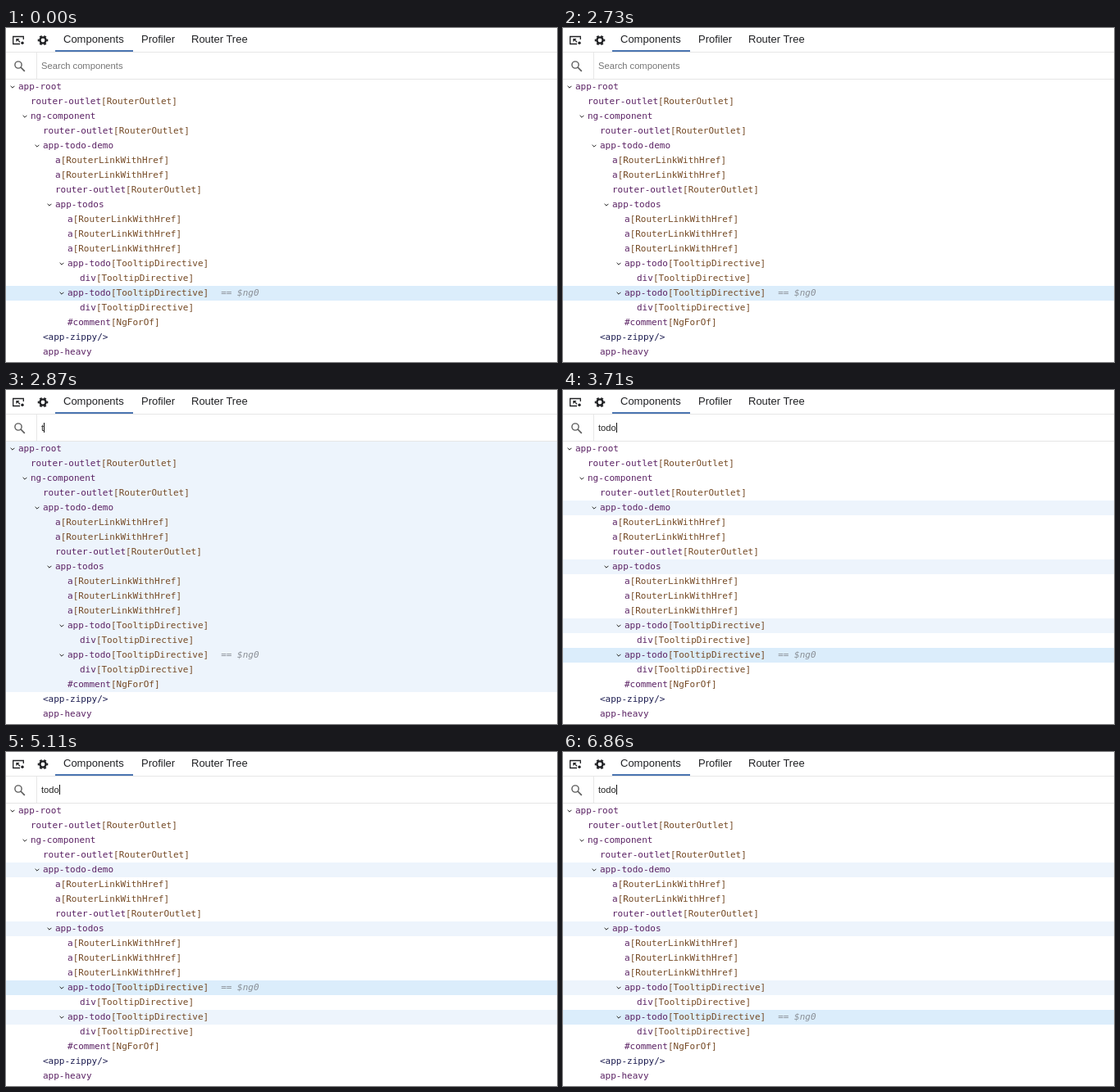
These frames come from a looping animation (672x408 px, 7.35 s). An HTML page:

```html
<!DOCTYPE html>
<html lang="en">
<head>
<meta charset="utf-8">
<title>Component tree search</title>
<style>
html, body { margin: 0; width: 100%; height: 100%; overflow: hidden; background: #fff; }
#stage { position: relative; width: 672px; height: 408px; overflow: hidden; font-family: "Liberation Sans", Arial, sans-serif; }
#stage > * { position: absolute; }
.line { background: #e6e6e6; }
.tab { top: 4px; font-size: 13px; line-height: 20px; color: #202124; white-space: pre; }
#field { left: 43px; top: 37px; font-size: 11.2px; line-height: 18px; color: #222; white-space: pre; }
#field.empty { color: #757575; }
#caret { display: inline-block; width: 1px; height: 12px; background: #111; vertical-align: -2px; }
#tree { left: 0; top: 63px; width: 672px; font: 11px/18px "DejaVu Sans Mono", monospace; color: #5a2163; }
.row { position: relative; height: 18px; white-space: pre; box-sizing: border-box; }
.row.match { background: #edf4fc; }
.row.selected { background: #dbedfb; }
.row.soft { background: #edf4fc; }
.dir { color: #754a25; }
.plain { color: #1c1c50; }
.ref { display: none; margin-left: 15px; color: #8a8f96; font-style: italic; }
.selected .ref { display: inline; }
.row svg { position: absolute; top: 7px; margin-left: -10px; }
</style>
</head>
<body>
<div id="stage">
  <div class="line" style="left:0;top:29px;width:672px;height:1px"></div>
  <div style="left:60px;top:27px;width:95px;height:2px;background:#4a74b0"></div>
  <div class="line" style="left:37px;top:30px;width:1px;height:32px"></div>
  <div class="line" style="left:0;top:62px;width:672px;height:1px"></div>
  <svg width="60" height="62" style="left:0;top:0" fill="none" stroke="#202124">
    <path d="M21.3 14V10.5H8.7V19.5H17" stroke-width="1.3"/>
    <path d="M12.3 13h4.2l-1.4 1.4 2.4 2.4-.9.9-2.4-2.4-1.9 1.8z" fill="#202124" stroke="none"/>
    <circle cx="20" cy="18.3" r="1.7" fill="#202124" stroke="none"/>
    <circle cx="45" cy="15" r="3.6" stroke-width="2.4"/>
    <circle cx="45" cy="15" r="5.3" stroke-width="2" pathLength="12" stroke-dasharray="1 1" stroke-dashoffset=".5"/>
    <g stroke="#5c5c5c">
      <circle cx="15" cy="45" r="4.1" stroke-width="1.4"/>
      <path d="M18 48l4.8 4.8" stroke-width="1.7"/>
    </g>
  </svg>
  <div class="tab" style="left:70px">Components</div>
  <div class="tab" style="left:165px">Profiler</div>
  <div class="tab" style="left:226px">Router Tree</div>
  <div id="field"><span id="query"></span><span id="caret"></span></div>
  <div id="tree"></div>
</div>
<script>
const LOOP = 7350;
const link = "a[RouterLinkWithHref]", outlet = "router-outlet[RouterOutlet]";
const todo = "app-todo[TooltipDirective]", tip = "div[TooltipDirective]";

// [depth, label, expandable]
const nodes = [
  [0, "app-root", 1], [1, outlet], [1, "ng-component", 1], [2, outlet],
  [2, "app-todo-demo", 1], [3, link], [3, link], [3, outlet],
  [3, "app-todos", 1], [4, link], [4, link], [4, link],
  [4, todo, 1], [5, tip], [4, todo, 1], [5, tip],
  [4, "#comment[NgForOf]"], [2, "<app-zippy/>"], [2, "app-heavy"]
];
const typing = [[0, ""], [2800, "t"], [2940, "to"], [3080, "tod"], [3220, "todo"]];
const picks = [[0, 14], [4200, 4], [4760, 8], [5040, 12], [5740, 14]];
const BLINK_FROM = 3710, BLINK = 515;

const $ = id => document.getElementById(id);
const arrow = '<svg width="6" height="5" fill="none" stroke="#222"><path d="M.6 .8 3 3.2 5.4 .8"/></svg>';
const escapeTag = s => s.replace(/</g, "&lt;");

const rows = nodes.map(([depth, label, open]) => {
  const row = document.createElement("div");
  const [, name, dir] = label.match(/^([^[]+)(.*)$/);
  row.style.paddingLeft = 15 + 15 * depth + "px";
  row.innerHTML = (open ? arrow : "") +
    `<span class="${name[0] === "<" ? "plain" : ""}">${escapeTag(name)}</span>` +
    `<span class="dir">${dir}</span><span class="ref">== $ng0</span>`;
  $("tree").append(row);
  return row;
});

const at = (steps, t) => steps.filter(s => s[0] <= t).pop()[1];

function draw(t) {
  const query = at(typing, t), pick = at(picks, t);
  $("query").textContent = query || "Search components";
  $("field").className = query ? "" : "empty";
  const lit = t < BLINK_FROM || Math.floor((t - BLINK_FROM) / BLINK) % 2 === 0;
  $("caret").style.visibility = query && lit ? "visible" : "hidden";
  rows.forEach((row, i) => {
    const match = query && nodes[i][1].toLowerCase().includes(query);
    row.className = "row" + (match ? " match" : "") +
      (i === pick ? " selected" : "") + (query === "t" && match ? " soft" : "");
  });
}

const start = performance.now();
function tick() {
  draw((performance.now() - start) % LOOP);
  requestAnimationFrame(tick);
}
tick();
</script>
</body>
</html>
```
